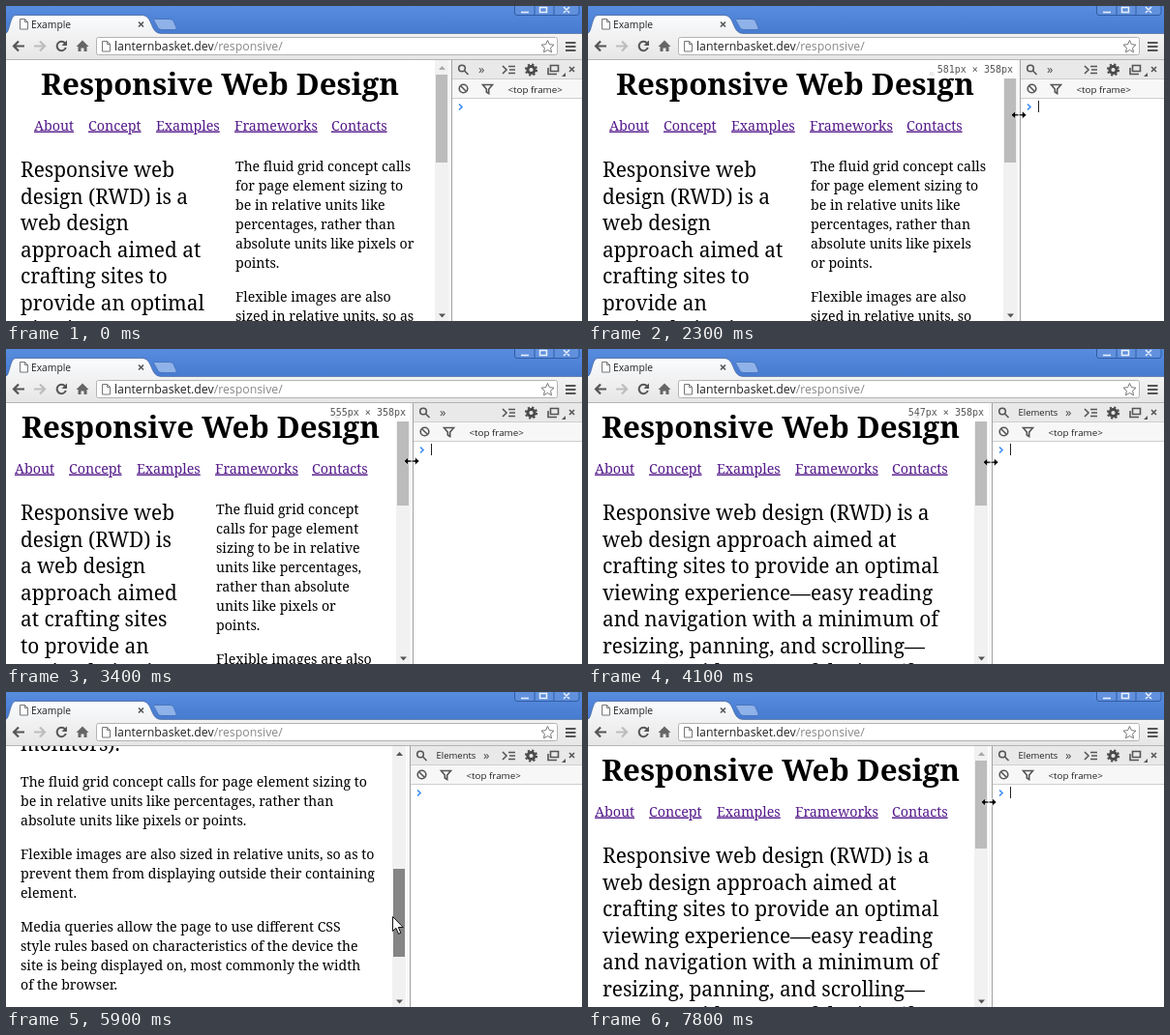
Recreate the animation shown at these times as an HTML page. Size 595 px wide and 326 px high, loop 8000 ms.

```html
<!DOCTYPE html>
<html lang="en">
<head>
<meta charset="utf-8">
<title>Responsive demo</title>
<style>
  html, body { margin: 0; width: 100%; height: 100%; overflow: hidden; background: #fff; }
  svg { display: block; width: 100vw; height: 100vh; }
  .serif { font-family: 'Noto Serif', serif; }
  .ui { font-family: 'Open Sans', 'Noto Sans', sans-serif; }
  .mono { font-family: 'DejaVu Sans Mono', monospace; }
  .link { fill: #551a8b; text-decoration: underline; }
  .line { fill: none; stroke: #555; stroke-width: 1.6; }
</style>
</head>
<body>
<svg viewBox="0 0 595 326">
  <defs>
    <linearGradient id="title" x2="0" y2="1">
      <stop offset="0" stop-color="#588cdf"/><stop offset="1" stop-color="#467bd0"/>
    </linearGradient>
    <linearGradient id="tab" x2="0" y2="1">
      <stop offset="0" stop-color="#fbfcfe"/><stop offset="1" stop-color="#f1f2f4"/>
    </linearGradient>
    <linearGradient id="bar" x2="0" y2="1">
      <stop offset="0" stop-color="#f3f3f4"/><stop offset="1" stop-color="#e6e6e6"/>
    </linearGradient>
    <g id="sheet" fill="#fff" stroke="#777">
      <path d="M.5.5h5l3 3v7.5h-8z"/><path d="M5.5.5v3h3" fill="none"/>
    </g>
  </defs>

  <rect width="595" height="326" fill="#fff"/>
  <g id="page"></g>

  <g id="view">
    <rect y="56" width="14" height="270" fill="#f1f1f1"/>
    <path id="up" d="M4 66l3.500-4 3.500 4z"/>
    <path d="M4 318.500l3.500 4 3.500-4z" fill="#555"/>
    <rect id="thumb" x="1" y="71" width="12" height="91"/>
    <g id="size">
      <rect x="-81" y="56" width="95" height="19" fill="#fff" opacity=".92"/>
      <text id="sizeText" class="mono" x="10" y="69" font-size="10" fill="#555" text-anchor="end"></text>
    </g>
  </g>

  <g id="tools">
    <rect x="-3" y="56" width="3" height="270" fill="#f7f7f7"/>
    <rect y="56" width="200" height="270" fill="#fff"/>
    <rect y="56" width="200" height="19" fill="#e9e9e9"/>
    <rect y="76" width="200" height="19" fill="#f7f7f7"/>
    <path d="M0 75.500h200M0 95.500h200" stroke="#cfcfcf"/>
    <path d="M.5 56v270" stroke="#a3a3a3"/>
    <circle class="line" cx="11" cy="64.500" r="3.300"/>
    <path class="line" d="M13.500 67l4 4" stroke-width="2.200"/>
    <text id="elements" class="ui" x="27.500" y="69" font-size="9.500" fill="#222">Elements</text>
    <text id="more" class="ui" y="70" font-size="13" fill="#444">»</text>
    <circle class="line" cx="12.500" cy="85.500" r="4.300"/>
    <path class="line" d="M9.500 82.500l6 6"/>
    <path class="line" d="M32.500 81.500h10l-3.800 4.500v4.500l-2.400-1.500v-3z" stroke-width="1.200"/>
    <text class="ui" x="58.500" y="89.500" font-size="9.800" fill="#222">&lt;top frame&gt;</text>
    <path d="M8 101.500l3 3-3 3" fill="none" stroke="#3b8df5" stroke-width="1.600"/>
    <path id="caret" d="M19.500 98v12" stroke="#222"/>
  </g>

  <g id="toolIcons">
    <path class="line" d="M513 62l4 4-4 4M519 62.500h7M520 66h6M519 69.500h7"/>
    <circle cx="542.500" cy="66" r="3.600" fill="none" stroke="#4a4a4a" stroke-width="3"/>
    <circle cx="542.500" cy="66" r="5.600" fill="none" stroke="#4a4a4a" stroke-width="2" stroke-dasharray="2.200"/>
    <path class="line" d="M562.500 61.500h8v6h-8zM560 64v6.500h9" stroke-width="1.400"/>
    <path d="M574 73h4v-4z" fill="#555"/>
    <path class="line" d="M582 63l5 5m0-5l-5 5" stroke-width="1.200"/>
  </g>

  <g id="browser">
    <rect width="595" height="28" fill="url(#title)"/>
    <path d="M525.500 0v7q0 2.500 2.500 2.500h61q3 0 3-2.500V0M546 0v9M566 0v9" fill="#6f9ade" fill-opacity=".45" stroke="#2f5ca6"/>
    <path d="M532 6.500h8M551.500 1.500h7v5h-7zM576 1l6 6m0-6l-6 6" fill="none" stroke="#eaf1fc" stroke-width="1.500"/>
    <path d="M153 13.500h16q3 0 4 2l3 7q.5 2-2 2h-13q-3 0-4-2l-4-7q-1-2 0-2z" fill="#8fb2e8" stroke="#4a76bf"/>
    <rect y="28" width="595" height="28" fill="url(#bar)"/>
    <path d="M0 28.500C4 27 4 9.500 10 9.500h130c6 0 8 4 10 9s4 9.500 10 10z" fill="url(#tab)"/>
    <path d="M0 28C4 27 4 9.500 10 9.500h130c6 0 8 4 10 9s4 9.500 10 10H595" fill="none" stroke="#4768a2" stroke-width=".8"/>
    <path d="M0 55.500h595" stroke="#b4b4b4"/>
    <use href="#sheet" x="14" y="13"/>
    <text class="ui" x="26" y="23" font-size="10.300" fill="#222">Example</text>
    <path class="line" d="M137 16.500l5 5m0-5l-5 5" stroke-width="1.400"/>
    <path d="M8 41.500h11M13 36.500l-5 5 5 5" fill="none" stroke="#555" stroke-width="2.200"/>
    <path d="M29 41.500h11M35 36.500l5 5-5 5" fill="none" stroke="#bdbdbd" stroke-width="2.200"/>
    <path d="M61 38.500a4.700 4.700 0 1 0 .8 4.500" fill="none" stroke="#555" stroke-width="2"/>
    <path d="M63 35.500v5.500h-5.500z" fill="#555"/>
    <path d="M79 35.500l6.500 6.500h-2v5h-3v-3.500h-3v3.500h-3v-5h-2z" fill="#666"/>
    <rect x="93.500" y="32.500" width="476" height="18" rx="2" fill="#fff" stroke="#b3b3b3"/>
    <use href="#sheet" x="99" y="36"/>
    <text class="ui" x="112" y="46" font-size="12.300" fill="#222">lanternbasket.dev<tspan fill="#888">/responsive/</tspan></text>
    <path d="M559.500 35.500l1.900 4.200 4.600.5-3.400 3.100.9 4.500-4-2.300-4 2.300.9-4.500-3.400-3.100 4.600-.5z" fill="#fff" stroke="#777"/>
    <path d="M578 38h10.500M578 42h10.500M578 46h10.500" stroke="#555" stroke-width="2"/>
  </g>

  <path id="arrow" d="M.5.5v15l3.400-3.200 2.600 6 2.300-1-2.500-5.800h4.900z" fill="#fff" stroke="#111"/>
  <g id="resize">
    <path d="M-8 0l4.500-4v3H3.500v-3L8 0 3.500 4V1h-7v3z" fill="#000" stroke="#fff" stroke-width=".6"/>
    <path d="M0-3v6" stroke="#fff" stroke-width="1"/>
  </g>
</svg>

<script>
const LOOP = 8000, STEP = 100;
const $ = id => document.getElementById(id);
const pen = document.createElement('canvas').getContext('2d');

// font size at which a sample line sets to the given measure
function sizeFor(sample, measure, weight = 'normal') {
  pen.font = `${weight} 100px 'Noto Serif', serif`;
  return 100 * measure / pen.measureText(sample).width;
}
const size = {
  head: sizeFor('Responsive Web Design', 370, 'bold'),
  link: sizeFor('AboutConceptExamplesFrameworksContacts', 305),
  lead: sizeFor('crafting sites to provide an optimal', 347.5),
  body: sizeFor('be in relative units like percentages, rather than', 323.5)
};

// each entry: smallest panel position at which these lines apply
const lead = [
  [448, 'Responsive web|design (RWD) is a|web design|approach aimed at|crafting sites to|provide an optimal|viewing'],
  [442, 'Responsive web|design (RWD) is a|web design|approach aimed at|crafting sites to|provide an|optimal viewing'],
  [432, 'Responsive web|design (RWD) is a|web design|approach aimed|at crafting sites|to provide an|optimal viewing'],
  [0, 'Responsive web|design (RWD) is|a web design|approach aimed|at crafting sites|to provide an|optimal viewing']
];
const body = [
  [452, 'The fluid grid concept calls|for page element sizing to|be in relative units like|percentages, rather than|absolute units like pixels or|points.||Flexible images are also|sized in relative units, so as'],
  [446, 'The fluid grid concept calls|for page element sizing to|be in relative units like|percentages, rather than|absolute units like pixels|or points.||Flexible images are also|sized in relative units, so'],
  [424, 'The fluid grid concept|calls for page element|sizing to be in relative|units like percentages,|rather than absolute|units like pixels or points.||Flexible images are also|sized in relative units, so'],
  [0, 'The fluid grid concept|calls for page element|sizing to be in relative|units like percentages,|rather than absolute|units like pixels or|points.||Flexible images are also']
];
const wideLead = 'Responsive web design (RWD) is a|web design approach aimed at|crafting sites to provide an optimal|viewing experience—easy reading|and navigation with a minimum of|resizing, panning, and scrolling—|across a wide range of devices (from|mobile phones to desktop computer|monitors).';
const wideBody = 'The fluid grid concept calls for page element sizing to|be in relative units like percentages, rather than|absolute units like pixels or points.||Flexible images are also sized in relative units, so as to|prevent them from displaying outside their containing|element.||Media queries allow the page to use different CSS|style rules based on characteristics of the device the|site is being displayed on, most commonly the width|of the browser.';
const links = [['About', -192], ['Concept', -136], ['Examples', -66], ['Frameworks', 15], ['Contacts', 115]];

const pick = (sets, w) => sets.find(s => w >= s[0])[1];
const text = (str, x, y, fs, more = '') =>
  `<text class="serif" x="${x}" y="${y}" font-size="${fs}" ${more}>${str}</text>`;

function block(lines, x, y, fs, step, gap) {
  return lines.split('|').map(str => {
    const out = str && text(str, x, y, fs);
    y += str ? step : gap;
    return out;
  }).join('');
}

function pageMarkup(w, edge) {
  const mid = (edge - 1) / 2, narrow = w < 419;
  const top = text('Responsive Web Design', mid, 92, size.head, 'font-weight="bold" text-anchor="middle"')
    + links.map(([s, dx]) =>
      `<text class="serif link" x="${mid + dx}" y="128.500" font-size="${size.link}">${s}</text>`).join('');
  return top
    + block(narrow ? wideLead : pick(lead, w), 15, 177, size.lead, 27.5, 0)
    + block(narrow ? wideBody : pick(body, w), narrow ? 15 : mid + 16, narrow ? 434 : 171, size.body, 20, 15);
}

// linear interpolation through [time, value] points
function along(t, pts) {
  if (t <= pts[0][0]) return pts[0][1];
  for (let i = 1; i < pts.length; i++) {
    const [t0, a] = pts[i - 1], [t1, b] = pts[i];
    if (t <= t1) return a + (b - a) * (t - t0) / (t1 - t0);
  }
  return pts[pts.length - 1][1];
}

// the divider is dragged in three pulls with short rests
const pulls = (a, b, c, d) => [[1900, a], [2800, b], [3000, b], [3400, c], [3500, c], [3900, d]];
const panelX = pulls(460, 428, 420, 417);
const edgeX = pulls(443, 411, 403, 399);
const pageW = [...pulls(595, 563, 555, 549), [4000, 549], [4100, 547]];
const thumbY = [[4900, 0], [5100, 22], [5600, 97], [5900, 112], [6100, 117], [6200, 117], [6300, 104], [6500, 62], [6700, 31], [6900, 10], [7100, 0]];
const mouseX = [[400, 588], [700, 540], [1100, 465], [1200, 460], [1300, 459], ...pulls(459, 427.5, 419, 416),
  [4700, 416], [4800, 410], [4900, 406], [5900, 399], [6500, 392], [7100, 391], [7500, 409], [7600, 414]];
const mouseY = [[400, 32], [700, 66], [1100, 106], [1200, 111], [1900, 111], [2800, 115], [3900, 117], [4900, 118],
  [5100, 142], [5600, 216], [5900, 232], [6100, 236], [6200, 236], [6500, 170], [6700, 140], [7100, 114]];

const show = (el, on) => el.setAttribute('display', on ? 'inline' : 'none');
const move = (el, x, y) => el.setAttribute('transform', `translate(${x} ${y})`);
const within = (t, a, b) => t >= a && t < b;
let drawnW;

function draw(t) {
  const w = Math.round(along(t, panelX)), edge = Math.round(along(t, edgeX)), off = along(t, thumbY);
  const layout = w + ',' + edge;
  if (layout !== drawnW) {
    $('page').innerHTML = pageMarkup(w, edge);
    drawnW = layout;
  }
  move($('page'), 0, -3 * off);
  move($('view'), edge, 0);
  move($('tools'), w, 0);

  $('thumb').setAttribute('y', 71 + off);
  $('thumb').setAttribute('fill', within(t, 4900, 7200) ? '#858585' : '#bcbcbc');
  $('up').setAttribute('fill', off > 0 ? '#555' : '#a8a8a8');
  $('sizeText').textContent = Math.round(along(t, pageW)) + 'px × 358px';
  show($('size'), within(t, 2000, 4800));
  show($('elements'), w < 419);
  $('more').setAttribute('x', w < 419 ? 76 : 28);
  show($('caret'), within(t, 1600, 4800) || t >= 7800);

  const x = along(t, mouseX), y = along(t, mouseY);
  const resizing = within(t, 1200, 4800) || t >= 7600;
  show($('resize'), resizing);
  show($('arrow'), t >= 400 && !resizing);
  move($('resize'), x, y);
  move($('arrow'), x, y);
}

let start, last = -1;
function tick(now) {
  start ??= now;
  const t = Math.floor((now - start) % LOOP / STEP) * STEP;
  if (t !== last) draw(last = t);
  requestAnimationFrame(tick);
}
draw(0);
requestAnimationFrame(tick);
</script>
</body>
</html>
```
